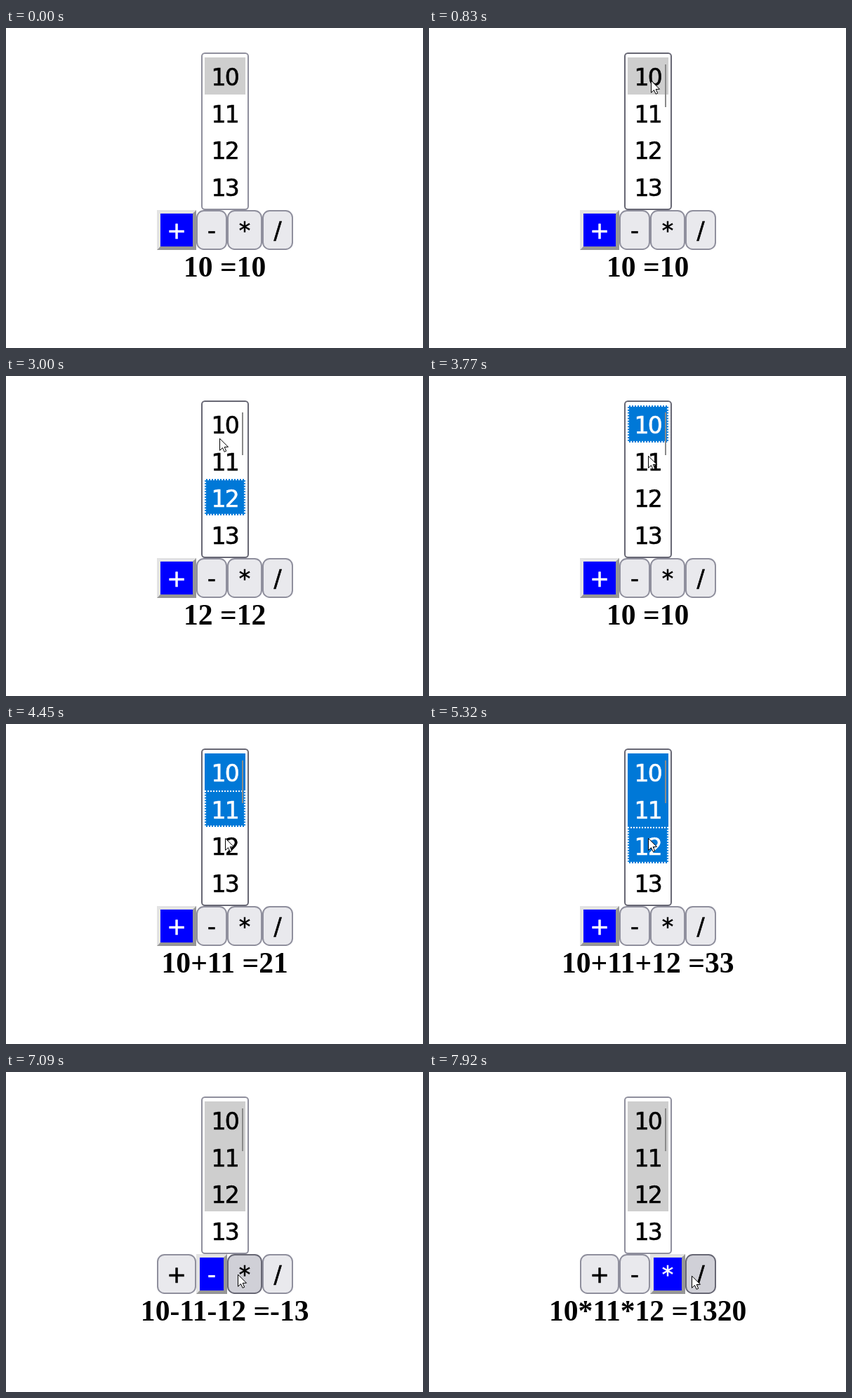
An HTML page with a canvas that plays this animation: 594x457 px, repeating every 7.99 s.

```html
<!DOCTYPE html>
<html lang="en">
<head>
<meta charset="utf-8">
<title>Multi-select calculator</title>
<style>
  html, body { margin: 0; width: 100%; height: 100%; overflow: hidden; background: #fff; }
  canvas { display: block; }
</style>
</head>
<body>
<canvas id="stage" width="594" height="457"></canvas>
<script>
const ctx = document.getElementById('stage').getContext('2d');
const LOOP = 7990;
const TICK = 70;
const SANS = '33px "DejaVu Sans", sans-serif';
const SERIF = 'bold 41.6px "Liberation Serif", "Times New Roman", serif';

const NUMBERS = [10, 11, 12, 13];
const OPERATORS = {
  '+': (a, b) => a + b,
  '-': (a, b) => a - b,
  '*': (a, b) => a * b,
  '/': (a, b) => a / b
};

// Border and fill for idle, hovered and pressed controls
const EDGE = ['#8f8f9d', '#676774', '#484851'];
const FACE = ['#e9e9ed', '#d0d0d7', '#b1b1b9'];

const LIST = { x: 278, y: 35, w: 68, h: 225 };
const rowTop = i => Math.floor(42.7 + 52.3 * i);

let edge = 215;
const BUTTONS = Object.keys(OPERATORS).map((label, i) => {
  const w = [56, 44, 50, 44][i];
  const button = { label, x: edge, y: 260, w, h: 57 };
  edge += w;
  return button;
});

// What the user does: glide to a point, then maybe click there
const ENTRY = { x: 547, y: 478 };
const VISITS = [
  { from: 70, to: 830, x: 316, y: 75, click: 1230 },
  { from: 1370, to: 1580, x: 316, y: 115, click: 2040 },
  { from: 2180, to: 2390, x: 316, y: 165, click: 2590 },
  { from: 2730, to: 3000, x: 304, y: 89 },
  { from: 3150, to: 3290, x: 309, y: 72, click: 3350 },
  { from: 3560, to: 3770, x: 312, y: 114, click: 4040, add: true },
  { from: 4180, to: 4450, x: 312, y: 163, click: 5180, add: true },
  { from: 5780, to: 6350, x: 302, y: 285, click: 6550 },
  { from: 6880, to: 7160, x: 337, y: 290, click: 7560 },
  { from: 7700, to: 7920, x: 374, y: 291 }
];

const inside = (p, r) => p.x >= r.x && p.x < r.x + r.w && p.y >= r.y && p.y < r.y + r.h;

function glide(t, { from, to, x, y }, start) {
  const steps = Math.round((to - from) / TICK) + 1;
  const done = Math.floor((t - from) / (to - from) * (steps - 1) + 1e-6) + 1;
  const k = Math.min(1, done / steps);
  return { x: Math.round(start.x + (x - start.x) * k), y: Math.round(start.y + (y - start.y) * k) };
}

function result({ chosen, operator }) {
  const values = chosen.map(i => NUMBERS[i]);
  return values.join(operator) + ' =' + values.reduce(OPERATORS[operator]);
}

// Replays the visits up to time t
function stateAt(t) {
  const s = { pointer: ENTRY, chosen: [0], focus: -1, operator: '+', pressed: false };
  s.text = result(s);
  for (const v of VISITS) {
    if (t < v.from) break;
    s.pointer = glide(t, v, s.pointer);
    if (!v.click || t < v.click) continue;

    const released = t >= v.click + TICK;
    s.pressed = !released;
    if (inside(v, LIST)) {
      s.focus = NUMBERS.findIndex((_, i) => v.y < rowTop(i + 1));
      s.chosen = v.add ? [...s.chosen, s.focus] : [s.focus];
    } else {
      s.focus = -1;
      if (released) s.operator = BUTTONS.find(b => inside(v, b)).label;
    }
    if (released) s.text = result(s);
  }
  return s;
}

function fillRect(color, x, y, w, h) {
  ctx.fillStyle = color;
  ctx.fillRect(x, y, w, h);
}

function poly(points, color) {
  ctx.beginPath();
  points.forEach(([x, y]) => ctx.lineTo(x, y));
  ctx.closePath();
  ctx.fillStyle = color;
  ctx.fill();
}

function box(r, radius, face, line) {
  ctx.beginPath();
  ctx.roundRect(r.x + 1, r.y + 1, r.w - 2, r.h - 2, radius);
  ctx.fillStyle = face;
  ctx.fill();
  ctx.lineWidth = 2;
  ctx.strokeStyle = line;
  ctx.stroke();
}

function text(str, x, y, font, color, weight = 0, spacing = 0) {
  ctx.font = font;
  ctx.letterSpacing = spacing + 'px';
  ctx.textAlign = 'center';
  ctx.fillStyle = ctx.strokeStyle = color;
  ctx.fillText(str, x, y);
  if (weight) {
    ctx.lineWidth = weight;
    ctx.strokeText(str, x, y);
  }
}

// Round dots, evenly spread so that each side starts and ends on one
function dots(x1, y1, x2, y2) {
  const length = Math.hypot(x2 - x1, y2 - y1);
  ctx.setLineDash([0.01, length / Math.round(length / 4) - 0.01]);
  ctx.beginPath();
  ctx.moveTo(x1, y1);
  ctx.lineTo(x2, y2);
  ctx.stroke();
}

function focusRing(x, y, w, h) {
  const l = x + 1, r = x + w - 1, u = y + 1, d = y + h - 1;
  ctx.save();
  ctx.lineWidth = 2.3;
  ctx.lineCap = 'round';
  ctx.strokeStyle = '#fff';
  dots(l, u, r, u);
  dots(l, d, r, d);
  dots(l, u, l, d);
  dots(r, u, r, d);
  ctx.restore();
}

function drawList({ chosen, focus }, look) {
  box(LIST, 4.3, '#fff', EDGE[look]);
  NUMBERS.forEach((n, i) => {
    const y = rowTop(i), h = rowTop(i + 1) - y;
    const on = chosen.includes(i), active = focus >= 0;
    if (on) fillRect(active ? '#0078d7' : '#cecece', 283, y, 58, h);
    if (i === focus) focusRing(283, y, 58, h);
    text(n, 311.8, Math.round(82.2 + 52.6 * i), SANS, on && active ? '#fff' : '#000', 0.6, -1.8);
  });
}

function drawButton(b, active, look) {
  const { x, y, w, h } = b, r = x + w, d = y + h;
  if (active) {
    fillRect('#e3e3e3', x, y, w, h);
    poly([[r, y], [r, d], [x, d], [x + 5, d - 5], [r - 5, d - 5], [r - 5, y + 5]], '#969696');
    fillRect('#00f', x + 5, y + 5, w - 10, h - 10);
  } else {
    box(b, 9.7, FACE[look], EDGE[look]);
  }
  text(b.label, x + w / 2, 301, SANS, active ? '#fff' : '#000', 0.6);
}

function drawPointer({ x, y }) {
  const shape = [[0, 0], [0, 17], [4, 13.3], [6.6, 19], [9.2, 17.9], [6.7, 12.2], [12, 12]];
  poly(shape.map(([px, py]) => [x + px + 0.5, y + py + 0.3]), '#fff');
  ctx.lineWidth = 1;
  ctx.strokeStyle = '#000';
  ctx.stroke();
}

function draw(t) {
  const s = stateAt(t);
  const { pointer, pressed } = s;
  const look = r => !inside(pointer, r) ? 0 : pressed ? 2 : 1;

  fillRect('#fff', 0, 0, 594, 457);
  drawList(s, look(LIST));
  BUTTONS.forEach(b => drawButton(b, b.label === s.operator, look(b)));
  text(s.text, 311.7, 355, SERIF, '#000');

  // Scroll thumb, shown once the pointer has reached the list
  if (t >= 700) fillRect('#8a8a8a', 336, 52, 2, 61);
  if (pressed) {
    ctx.beginPath();
    ctx.arc(pointer.x, pointer.y, 12, 0, Math.PI * 2);
    ctx.fillStyle = 'rgba(255, 255, 0, 0.5)';
    ctx.fill();
  }
  drawPointer(pointer);
}

const begin = performance.now();
function tick() {
  draw((performance.now() - begin) % LOOP);
  requestAnimationFrame(tick);
}
tick();
</script>
</body>
</html>
```
